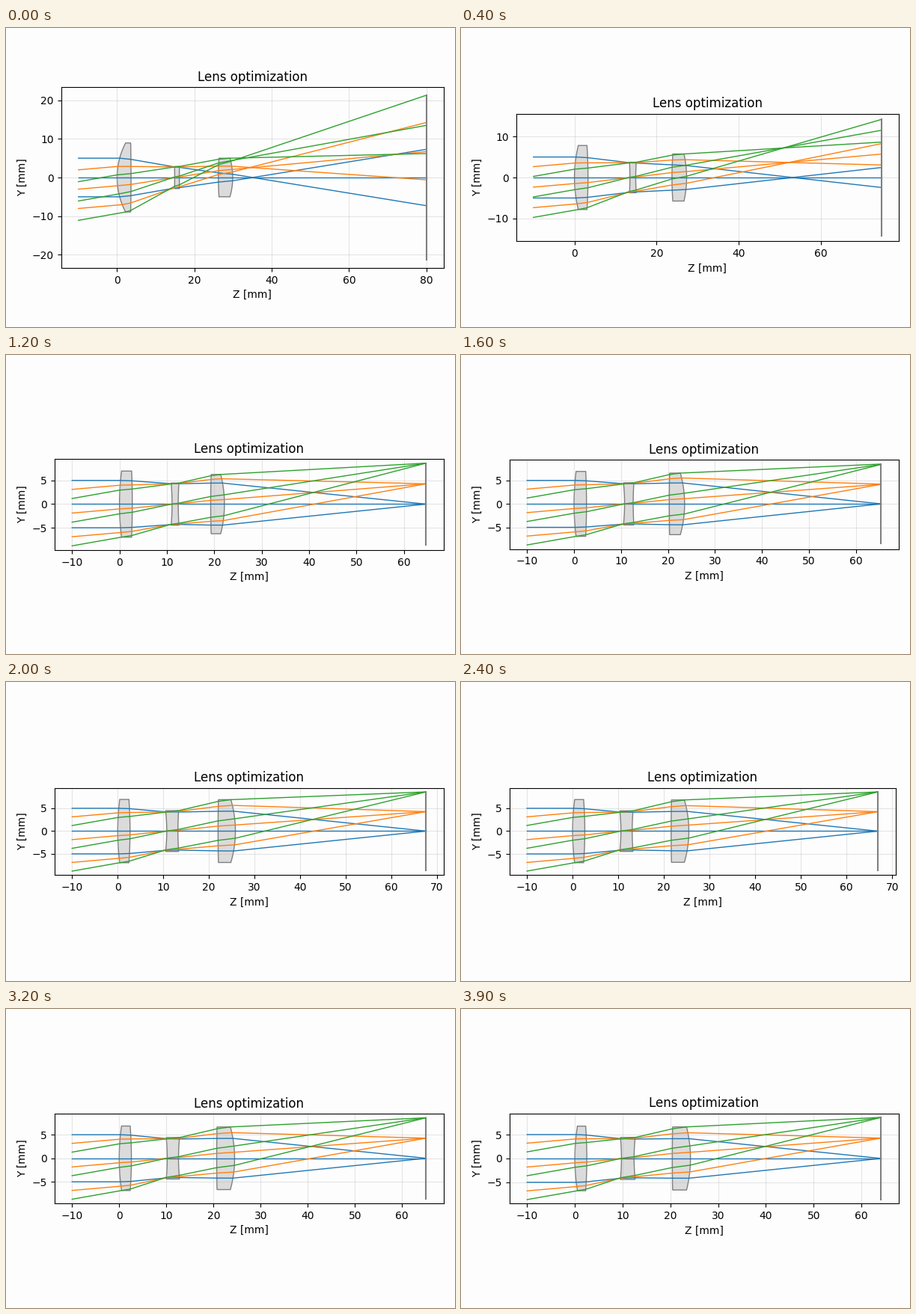
Recreate the animation shown at these times as a matplotlib script. Size 600 px wide and 400 px high, loop 6500 ms.

```python
import numpy as np
import matplotlib.pyplot as plt
from matplotlib.animation import FuncAnimation

FRAMES, STEP_MS = 65, 100
N_GLASS = 1.62
Z_START = -10.0
PUPIL = np.array([5.0, 0.0, -5.0])
FIELDS = np.radians([0, 5, 10])
BACK = "#fdfdfd"

# Design states along the optimization, one row per step number in STEPS:
# five gaps, image z | curvatures c1 c3 c5 c6 | marginal height at lens 2, 3 |
# full-field image height, defocus, upper and lower ray error
STEPS = np.array([0, 8, 12, 20, 27, 32, 39])
STATES = np.array([
    [3.60, 11.30, 1.20, 10.10, 3.70, 80.0, .052, -.010, .0125, -.056,
     2.75, 1.25, 13.50, -7.3, 0, .5],
    [3.00, 9.25, 1.45, 7.75, 3.30, 69.7, .019, -.018, .010, -.033,
     4.12, 4.15, 9.90, 0, -.45, .05],
    [2.70, 8.40, 1.30, 6.85, 2.90, 64.7, .018, -.020, .005, -.040,
     4.30, 4.42, 8.65, 0, 0, 0],
    [2.70, 8.05, 2.45, 8.80, 3.80, 67.6, .0185, -.025, .003, -.041,
     4.20, 4.33, 8.60, 0, 0, 0],
    [2.65, 7.80, 2.40, 8.20, 3.85, 66.0, .0195, -.024, .003, -.041,
     4.16, 4.26, 8.60, 0, 0, 0],
    [2.58, 7.60, 2.40, 8.10, 3.80, 65.1, .021, -.022, .003, -.040,
     4.15, 4.20, 8.60, 0, 0, 0],
    [2.50, 7.25, 2.65, 8.00, 3.80, 64.1, .0235, -.022, .003, -.037,
     4.13, 4.13, 8.60, 0, 0, 0],
])
SLOPES = np.gradient(STATES, STEPS, axis=0, edge_order=2)


def state_at(step):
    """Cubic Hermite interpolation of the design states."""
    step = min(step, STEPS[-1])
    i = min(np.searchsorted(STEPS, step, side="right") - 1, len(STEPS) - 2)
    h = STEPS[i + 1] - STEPS[i]
    t = (step - STEPS[i]) / h
    return ((1 + 2 * t) * (1 - t) ** 2 * STATES[i]
            + t * (1 - t) ** 2 * h * SLOPES[i]
            + t * t * (3 - 2 * t) * STATES[i + 1]
            + t * t * (t - 1) * h * SLOPES[i + 1])


def solve_back(y, u, c_front, thick, gap, target):
    """Back curvature that sends the marginal ray to the target height."""
    nu = u - y * (N_GLASS - 1) * c_front
    y_back = y + thick * nu / N_GLASS
    u_out = (target - y_back) / gap
    return (u_out - nu) / (y_back * (N_GLASS - 1)), u_out


def entrance_pupil(t1, t2, c1, c2):
    y2 = -t2
    nu = 1 + y2 * (1 - N_GLASS) * c2
    y1 = y2 - t1 * nu / N_GLASS
    return -y1 / (nu + y1 * (N_GLASS - 1) * c1)


def refract(z, y, dz, dy, vertex, c, mu):
    """Intersect rays with a spherical surface and apply Snell's law."""
    y = y + (vertex - z) * dy / dz
    f, g = c * y * y, dz - c * y * dy
    cos_in = np.sqrt(g * g - c * f)
    dist = f / (g + cos_in)
    sag, y = dist * dz, y + dist * dy
    k = np.sqrt(1 - mu * mu * (1 - cos_in ** 2)) - mu * cos_in
    return vertex + sag, y, mu * dz + k * (1 - c * sag), mu * dy - k * c * y


def trace(step):
    s = state_at(step)
    gaps, z_img = s[:5], s[5]
    c1, c3, c5, c6, y3, y5, height, defocus, err_up, err_low = s[6:]
    c2, u = solve_back(PUPIL[0], 0, c1, gaps[0], gaps[1], y3)
    c4, _ = solve_back(y3, u, c3, gaps[2], gaps[3], y5)
    curv = [c1, c2, c3, c4, c5, c6]
    verts = np.concatenate([[0], np.cumsum(gaps)])

    angle, p = (a.ravel() for a in np.meshgrid(FIELDS, PUPIL, indexing="ij"))
    tan = np.tan(angle)
    z = np.full(p.shape, Z_START)
    y = p - tan * (entrance_pupil(gaps[0], gaps[1], c1, c2) - Z_START)
    dz, dy = np.cos(angle), np.sin(angle)
    zs, ys = [z], [y]
    for k, (v, c) in enumerate(zip(verts, curv)):
        mu = N_GLASS if k % 2 else 1 / N_GLASS
        z, y, dz, dy = refract(z, y, dz, dy, v, c, mu)
        zs.append(z)
        ys.append(y)
    error = np.where(p > 0, err_up, np.where(p < 0, err_low, 0))
    zs.append(np.full(p.shape, z_img))
    ys.append((height + error) * tan / np.tan(FIELDS[-1])
              + defocus * p / PUPIL[0])
    return verts, curv, np.array(zs), np.array(ys)


def lens_outline(front, back, c_front, c_back, semi):
    y = np.linspace(-semi, semi, 60)

    def arc(v, c):
        return v + c * y * y / (1 + np.sqrt(1 - (c * y) ** 2))

    return (np.concatenate([arc(front, c_front), arc(back, c_back)[::-1]]),
            np.concatenate([y, y[::-1]]))


fig, ax = plt.subplots(figsize=(6, 4), dpi=100, facecolor=BACK)


def draw(step):
    ax.clear()
    ax.set_facecolor(BACK)
    verts, curv, zs, ys = trace(step)
    for k in (0, 2, 4):
        semi = np.abs(ys[k + 1:k + 3]).max()
        ax.fill(*lens_outline(verts[k], verts[k + 1], curv[k], curv[k + 1], semi),
                facecolor=("lightgray", 0.8), edgecolor="gray", lw=1)
    for i in range(zs.shape[1]):
        ax.plot(zs[:, i], ys[:, i], color=f"C{i // 3}", lw=1)
    edge = np.abs(ys[-1]).max()
    ax.plot([zs[-1, 0]] * 2, [-edge, edge], color="gray", lw=1.5)

    ax.set_title("Lens optimization")
    ax.set_xlabel("Z [mm]")
    ax.set_ylabel("Y [mm]")
    ax.set_aspect("equal")
    ax.grid(alpha=0.3)
    fig.subplots_adjust(left=0.12, right=0.975, bottom=0.0375, top=0.9625)
    fig.tight_layout()
    return []


anim = FuncAnimation(fig, draw, frames=FRAMES, interval=STEP_MS,
                     repeat=True, repeat_delay=0)
plt.show()
```
